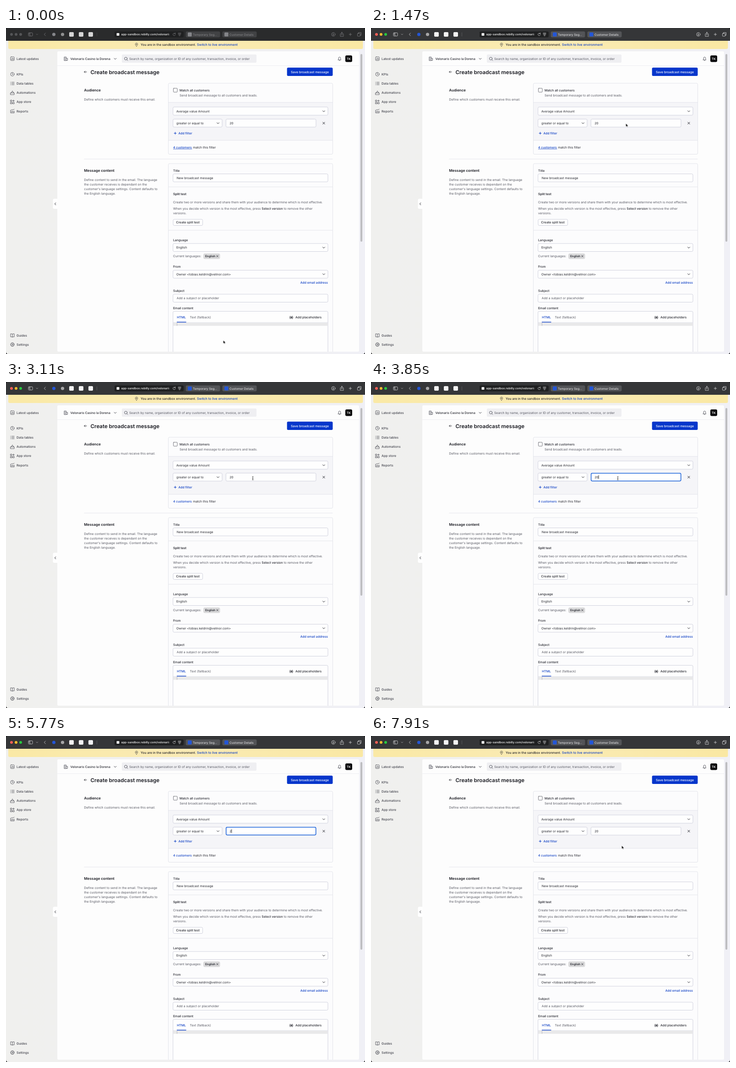
Write an HTML page that moves like this. It is 784 px wide and 714 px high and loops after 8 s.

```html
<!DOCTYPE html>
<html lang="en">
<head>
<meta charset="utf-8">
<title>Create broadcast message</title>
<style>
  html, body { margin: 0; width: 100%; height: 100%; overflow: hidden; background: #efeff1; }
  svg { display: block; width: 100vw; height: 100vh; }
  /* y marks the middle of the capitals */
  text { font: 400 6.82px Inter, Roboto, sans-serif; fill: #24252d; transform: translateY(.364em); text-rendering: geometricPrecision; }
  .medium { font-weight: 500; }
  .semi { font-weight: 600; }
  .soft { fill: #555660; }
  .link { fill: #0d3fc4; font-weight: 500; }
  .heading { font-weight: 600; font-size: 7.95px; fill: #17181f; }
  .line, .icons { fill: none; stroke: #3c3d47; stroke-width: .8; stroke-linecap: round; stroke-linejoin: round; }
  .side text { fill: #42434c; font-weight: 500; font-size: 6.9px; }
  .side .icons { stroke: #42434c; }
  .rule { stroke: #dcdde6; stroke-width: .8; fill: none; }
  .card { fill: #fcfcfd; stroke: #dcdde6; stroke-width: .8; }
  .field { fill: #fefefe; stroke: #c6c7d6; stroke-width: .8; }

  /* One 8 s timeline drives every part. */
  .anim { animation: 8s step-end infinite; }

  /* Browser toolbar: background window becomes active */
  #bar { animation-name: wake; }
  #bar .base { fill: var(--base); }
  #bar .tab { fill: var(--tab); }
  #bar .mark { fill: var(--mark); }
  #bar .ext { fill: var(--ext); }
  #bar .icons { stroke: var(--ink); }
  #bar text { fill: var(--ink); font-size: 6.45px; font-weight: 500; }
  #bar .url { fill: #e6e6e6; font-weight: 600; font-size: 6.35px; }
  #bar .red { fill: var(--red); } #bar .amber { fill: var(--amber); } #bar .green { fill: var(--green); }
  @keyframes wake {
    0% { --base: #2a2b2c; --tab: #414244; --ink: #808184; --mark: #85868a; --ext: #d6d6d6;
         --red: #555658; --amber: #555658; --green: #555658; }
    15.5%, 100% { --base: #353638; --tab: #535457; --ink: #dcdcde; --mark: #2456d6; --ext: #f3f3f3;
         --red: #fe5f57; --amber: #febc2e; --green: #28c840; }
  }

  #underline { animation-name: unhover; }
  @keyframes unhover { 0% { opacity: 1 } 21.75%, 100% { opacity: 0 } }

  #focus { animation-name: focus; }
  @keyframes focus { 0%, 92.5%, 100% { opacity: 0 } 45.6% { opacity: 1 } }

  #zero { animation-name: retype; }
  @keyframes retype { 0%, 75%, 100% { fill-opacity: 1 } 58.75% { fill-opacity: 0 } }

  #caret { animation-name: caret, blink; }
  @keyframes caret { 0%, 75%, 100% { transform: translateX(497.1px) } 58.75% { transform: translateX(492.6px) } }
  @keyframes blink {
    0%, 51.9%, 65%, 83.8%, 92.5%, 100% { opacity: 0 }
    45.6%, 58.75%, 71%, 88.5% { opacity: 1 }
  }

  #result { animation-name: fade; }
  @keyframes fade { 0%, 66.25%, 81.25%, 100% { opacity: 1 } 60.5%, 76.25% { opacity: .2 } }
  #loader { animation-name: load; }
  @keyframes load { 0%, 66.25%, 81.25%, 100% { opacity: 0 } 60.5%, 76.25% { opacity: 1 } }

  #pointer { animation: move 8s ease-in-out infinite; }
  @keyframes move {
    0%, .25% { transform: translate(474.5px, 684px) }
    7.3%, 21.5% { transform: translate(556.5px, 209px) }
    28.5%, 31.9% { transform: translate(500.5px, 227px) }
    37.8%, 86.9% { transform: translate(539px, 210.7px) }
    93.5%, 100% { transform: translate(547.5px, 240px) }
  }
  #arrow { animation-name: arrow; }
  @keyframes arrow { 0%, 89.3%, 100% { opacity: 1 } 35.6% { opacity: 0 } }
  #beam { animation-name: beam; }
  @keyframes beam { 0%, 57.5%, 89.3%, 100% { opacity: 0 } 35.6%, 86.9% { opacity: 1 } }
</style>
</head>
<body>
<svg viewBox="0 0 784 714" preserveAspectRatio="none">
  <defs>
    <path id="chevron" d="M-2.4-1.2 0 1.2 2.4-1.2"/>
    <path id="cross" d="M-2.3-2.3 2.3 2.3M2.3-2.3-2.3 2.3"/>
    <path id="plus" d="M-2.8 0H2.8M0-2.8V2.8"/>
    <clipPath id="address"><rect x="250" y="5" width="106.5" height="16"/></clipPath>
    <clipPath id="panel"><path d="M112 51H771V709H112Z"/></clipPath>
    <linearGradient id="sand"><stop stop-color="#fae9a5"/><stop offset=".5" stop-color="#faebb5"/><stop offset="1" stop-color="#fae8a3"/></linearGradient>
    <linearGradient id="page"><stop stop-color="#f0f0ee"/><stop offset=".8" stop-color="#f0f0f2"/><stop offset="1" stop-color="#f0f0f6"/></linearGradient>
  </defs>

  <rect width="784" height="714" fill="#18191a"/>
  <path d="M0 20H784V709Q784 714 779 714H5Q0 714 0 709Z" fill="url(#page)"/>

  <!-- Browser toolbar -->
  <g id="bar" class="anim">
    <path class="base" d="M0 28V5Q0 0 5 0H779Q784 0 784 5V28Z"/>
    <circle class="red" cx="12" cy="14" r="3"/><circle class="amber" cx="22" cy="14" r="3"/><circle class="green" cx="32" cy="14" r="3"/>
    <circle class="mark" cx="104.5" cy="14" r="3.6"/>
    <circle class="ext" cx="123.5" cy="14" r="3.6" opacity=".6"/>
    <rect class="ext" x="138" y="9" width="10" height="10" rx="2"/>
    <rect class="ext" x="159" y="9" width="10" height="10" rx="2"/>
    <rect class="ext" x="180" y="9" width="10" height="10" rx="2"/>
    <rect x="237" y="7.5" width="151" height="13" rx="3" fill="#1f2021"/>
    <rect x="241.5" y="11" width="6" height="6" rx="1" fill="#e6e6e6"/>
    <text class="url" x="251.5" y="14.2" clip-path="url(#address)">app-sandbox.rebilly.com/velonaris</text>
    <rect class="tab" x="392.5" y="7.5" width="75" height="13" rx="3"/>
    <rect class="tab" x="472.5" y="7.5" width="75" height="13" rx="3"/>
    <rect class="mark" x="397" y="9.8" width="8.6" height="8.6" rx="1.5"/>
    <rect class="mark" x="477" y="9.8" width="8.6" height="8.6" rx="1.5"/>
    <text x="408" y="14.2">Temporary Seg…</text>
    <text x="488" y="14.2">Customer Details</text>
    <g class="icons">
      <rect x="49" y="10.5" width="9" height="7" rx="1.2"/><path d="M52.2 10.5V17.5M50.2 12.4H51M50.2 14H51"/>
      <use href="#chevron" transform="translate(67.8 14) scale(.75)"/>
      <path d="M86.3 11 83.4 14 86.3 17"/>
      <path d="M198.5 10V18" opacity=".25"/>
      <path d="M369.5 12.4A2.7 2.7 0 1 0 370 14.5M369.8 10.5V12.6H367.8"/>
      <path d="M376 11H382M376 13H382M377 15H381M378 17H380"/>
      <circle cx="715" cy="14" r="4"/><path d="M715 11.6V16M713.3 14.5 715 16.1 716.7 14.5"/>
      <path d="M732 12.8H730V18.3H737V12.8H735M733.5 15.5V9.2M731.8 10.8 733.5 9.1 735.2 10.8"/>
      <use href="#plus" x="752" y="14"/>
      <rect x="767.5" y="12" width="6" height="6" rx="1"/><path d="M769.5 12V10H775.5V16H773.5"/>
    </g>
  </g>

  <!-- Sandbox banner -->
  <path d="M5 28H779.5V43Q779.5 46 776 46H8.5Q5 46 5 43Z" fill="url(#sand)"/>
  <path class="line" d="M285 40C281 36.6 281.8 33 285 33S289 36.6 285 40Z"/><circle cx="285" cy="35.8" r=".9"/>
  <text class="medium" x="294" y="36.5" style="font-size:6.95px">You are in the sandbox environment.</text>
  <text class="link" x="417" y="36.5" style="font-size:7.05px">Switch to live environment</text>

  <!-- Sidebar -->
  <g class="side">
    <g class="icons">
      <rect x="10" y="63.2" width="8" height="8" rx="1.3"/><path d="M12 69.2V67.5M14 69.2V65.5M16 69.2V66.6"/>
      <circle cx="14" cy="101.2" r="4"/><path d="M14 101.5V98.8M14 101.5 15.5 102"/>
      <path d="M10 118.8H10.6M10 121.5H10.6M10 124.2H10.6M12.5 118.8H18M12.5 121.5H18M12.5 124.2H18"/>
      <path d="M10 142.2H18V146H10ZM11.5 142V140.5Q14 138.5 16.5 140.5V142M14 139V137.6"/>
      <path d="M10 158H13V161H10ZM10 163H13V166H10ZM15 163H18V166H15ZM16.5 157.6V161.2M14.7 159.4H18.3"/>
      <path d="M10 180V186H18V182M12 184.3V182.6M14 184.3V181.6M16 184.3V182.4M11 180 13.5 178.6 15 179.4 18 177.8"/>
      <path d="M14 670.4Q12 669.3 10 669.8V676.4Q12 676 14 677 16 676 18 676.4V669.8Q16 669.3 14 670.4V677"/>
      <circle cx="14" cy="693.3" r="3.6"/><circle cx="14" cy="693.3" r="1.2"/>
      <circle cx="14" cy="693.3" r="4.1" stroke-dasharray="1 2.2"/>
    </g>
    <text x="23" y="67.2">Latest updates</text>
    <text x="23" y="101.2">KPIs</text>
    <text x="23" y="121.5">Data tables</text>
    <text x="23" y="141.7">Automations</text>
    <text x="23" y="161.9">App store</text>
    <text x="23" y="182.1">Reports</text>
    <text x="23" y="673.2">Guides</text>
    <text x="23" y="693.4">Settings</text>
  </g>
  <path d="M112 374H105.5Q102.5 374 102.5 377V393Q102.5 396 105.5 396H112Z" fill="#fff"/>

  <!-- Main panel -->
  <path d="M115 51H768Q771 51 771 54V706Q771 709 768 709H115Q112 709 112 706V54Q112 51 115 51Z" fill="#fdfdfd"/>
  <path class="line" d="M108.8 382.8 106.4 385.2 108.8 387.6" style="stroke:#17181f;stroke-width:1"/>
  <rect x="774" y="57" width="4.2" height="411" rx="2.1" fill="#bebec1"/>

  <g clip-path="url(#panel)">
    <path class="rule" d="M112 82.5H771" opacity=".6"/>
    <g class="line">
      <path d="M127 71V63.5H131.5V71ZM131.5 66.5H134.5V71H131.5M128.7 65.5H129.7M128.7 67.5H129.7M128.7 69.3H129.7"/>
      <use href="#chevron" x="238.5" y="67.5" style="stroke-width:1"/>
      <path d="M725.2 69.8H731.8L730.8 68.4V66.2Q730.8 63.6 728.5 63.6T726.2 66.2V68.4ZM727.5 71.2H729.5"/>
    </g>
    <text class="medium" x="140.5" y="67.4">Velonaris Casino la Dorena</text>
    <rect x="253" y="58" width="294" height="18" rx="2.5" fill="#efeff2"/>
    <g class="line"><circle cx="261.7" cy="67" r="3"/><path d="M263.9 69.3 266 71.4"/></g>
    <text class="soft" x="269" y="67.5">Search by name, organization or ID of any customer, transaction, invoice, or order</text>
    <rect x="741" y="60" width="15" height="14.5" rx="3" fill="#08080a"/>
    <text class="semi" x="748.5" y="67.4" text-anchor="middle" style="fill:#fff;font-size:6.5px">TK</text>

    <path class="line" d="M176.2 96.2H170.8M173 94 170.8 96.2 173 98.4" style="stroke:#17181f"/>
    <text class="semi" x="184.5" y="96.6" style="font-size:11.6px;fill:#17181f">Create broadcast message</text>
    <rect x="613.7" y="86.7" width="99.8" height="18.3" rx="2.5" fill="#0636cb"/>
    <text class="medium" x="663.5" y="96" text-anchor="middle" style="font-size:6.93px;fill:#fff">Save broadcast message</text>

    <!-- Audience -->
    <text class="heading" x="170.5" y="136.5">Audience</text>
    <text class="soft" x="170.5" y="156.5">Define which customers must receive this email.</text>
    <rect class="card" x="354.5" y="121" width="359" height="155.5" rx="2.5"/>
    <rect x="355" y="163" width="358" height="83" fill="#f5f5f8"/>
    <path class="rule" d="M354.5 163H713.5M354.5 246H713.5"/>
    <rect class="line" x="365.6" y="132" width="8.4" height="8.4" rx="1" style="fill:#fff;stroke:#55565f"/>
    <text x="379" y="136.4" class="medium">Match all customers</text>
    <text class="soft" x="379" y="147.4">Send broadcast message to all customers and leads.</text>

    <rect class="field" x="364.7" y="173" width="338.3" height="18" rx="2.5"/>
    <text x="372" y="182.2">Average value Amount</text>
    <rect class="field" x="364.7" y="199.5" width="107.3" height="17.5" rx="2.5"/>
    <text x="372" y="208.5">greater or equal to</text>
    <rect class="field" x="480.3" y="199.5" width="196.7" height="17.5" rx="2.5"/>
    <rect id="focus" class="anim" x="480.7" y="199.7" width="196" height="17" rx="2.5" fill="#fff" stroke="#1f66dc" stroke-width="1.5"/>
    <text x="488.2" y="208.5">2<tspan id="zero" class="anim">0</tspan></text>
    <path id="caret" class="anim" d="M0 204.2V212.5" stroke="#111" stroke-width=".9"/>
    <use href="#plus" x="369.5" y="230.5" stroke="#0d3fc4"/>
    <text class="link" x="376.5" y="230.6">Add filter</text>

    <g id="result" class="anim">
      <text class="link" x="365" y="261.4">4 customers</text>
      <path id="underline" class="anim" d="M365 265.2H406.4" stroke="#0d3fc4" stroke-width=".7"/>
      <text x="408.2" y="261.4">match this filter</text>
    </g>
    <g id="loader" class="anim">
      <rect x="525" y="252" width="18.5" height="18.5" rx="1.5" fill="#727272"/>
      <path d="M529.5 265.5H532.2" stroke="#fff" stroke-width="1"/>
    </g>

    <path class="rule" d="M170.5 287H713.5"/>

    <!-- Message content -->
    <text class="heading" x="170.5" y="312.6">Message content</text>
    <text class="soft" x="170.5" y="332.5">Define content to send in the email. The language</text>
    <text class="soft" x="170.5" y="342.6">the customer receives is dependant on the</text>
    <text class="soft" x="170.5" y="352.7">customer's language settings. Content defaults to</text>
    <text class="soft" x="170.5" y="362.8">the English language.</text>
    <rect class="card" x="354.5" y="297" width="359" height="430" rx="2.5"/>
    <path class="rule" d="M354.5 348H713.5M354.5 443H713.5"/>

    <text class="medium" x="365" y="312.6">Title</text>
    <rect class="field" x="364.7" y="319.5" width="338.3" height="17.5" rx="2.5"/>
    <text x="372.7" y="328.5">New broadcast message</text>

    <text class="semi" x="365" y="363.4">Split test</text>
    <text class="soft" x="365" y="381.5">Create two or more versions and share them with your audience to determine which is most effective.</text>
    <text class="soft" x="365" y="395.6">When you decide which version is the most effective, press <tspan class="medium" fill="#24252d">Select version</tspan> to remove the other</text>
    <text class="soft" x="365" y="405.7">versions.</text>
    <rect class="field" x="365" y="419" width="64.5" height="13.5" rx="2.5"/>
    <text class="medium" x="397.2" y="425.8" text-anchor="middle">Create split test</text>

    <text class="medium" x="365" y="464.6">Language</text>
    <rect class="field" x="364.7" y="472" width="338.3" height="17.5" rx="2.5"/>
    <text x="372" y="481">English</text>
    <text class="soft" x="365" y="500">Current languages:</text>
    <rect x="431" y="493.7" width="36.5" height="12.3" rx="3.5" fill="#dadadb"/>
    <text class="semi" x="435" y="500" style="font-size:6.3px">English</text>

    <text class="medium" x="365" y="523">From</text>
    <rect class="field" x="364.7" y="530.5" width="338.3" height="17.5" rx="2.5"/>
    <text x="372" y="539.4">Owner &lt;tobias.keldrin@velinor.com&gt;</text>
    <text class="link" x="703" y="557.6" text-anchor="end">Add email address</text>

    <text class="medium" x="365" y="575.7">Subject</text>
    <rect class="field" x="364.7" y="583" width="338.3" height="17.5" rx="2.5"/>
    <text class="soft" x="372.7" y="592">Add a subject or placeholder</text>

    <text class="medium" x="365" y="614">Email content</text>
    <rect class="field" x="364.7" y="620.5" width="338.3" height="100" rx="2.5"/>
    <rect x="365.1" y="645.3" width="337.5" height="7" fill="#e9e9ea"/>
    <path class="rule" d="M365 645H703"/>
    <path d="M373.5 646V652.3" stroke="#aaabb0" stroke-width=".7"/>
    <path d="M373 644.2H393.5" stroke="#0d3fc4" stroke-width="1.4"/>
    <text class="link semi" x="373.3" y="634">HTML</text>
    <text class="soft" x="401.5" y="634">Text (fallback)</text>
    <path class="line" d="M620.5 630.8Q618 634 620.5 637.2M625.5 630.8Q628 634 625.5 637.2M622.3 632V636M624 632V636M621.3 633.2H625M621.3 634.9H625" style="stroke:#24252d"/>
    <text class="medium" x="632" y="634">Add placeholders</text>

    <g class="line" style="stroke:#24252d;stroke-width:1">
      <use href="#chevron" x="694" y="182.3"/><use href="#chevron" x="463" y="208.5"/>
      <use href="#chevron" x="694" y="481"/><use href="#chevron" x="694" y="539.3"/>
      <use href="#cross" x="694" y="208.4"/><use href="#cross" transform="translate(461.5 499.8) scale(.85)"/>
    </g>
  </g>

  <g id="pointer">
    <path id="arrow" class="anim" d="M0 0V7.2L1.7 5.7 2.8 8.2 4.1 7.6 3 5.2H5.2Z" fill="#0a0a0a" stroke="#fff" stroke-width=".6"/>
    <path id="beam" class="anim" d="M-1.5-3.8Q0-3.8 0-2.8 0-3.8 1.5-3.8M0-2.8V2.8M-1.5 3.8Q0 3.8 0 2.8 0 3.8 1.5 3.8M-1 .8H1" fill="none" stroke="#222" stroke-width=".8"/>
  </g>
</svg>
</body>
</html>
```
